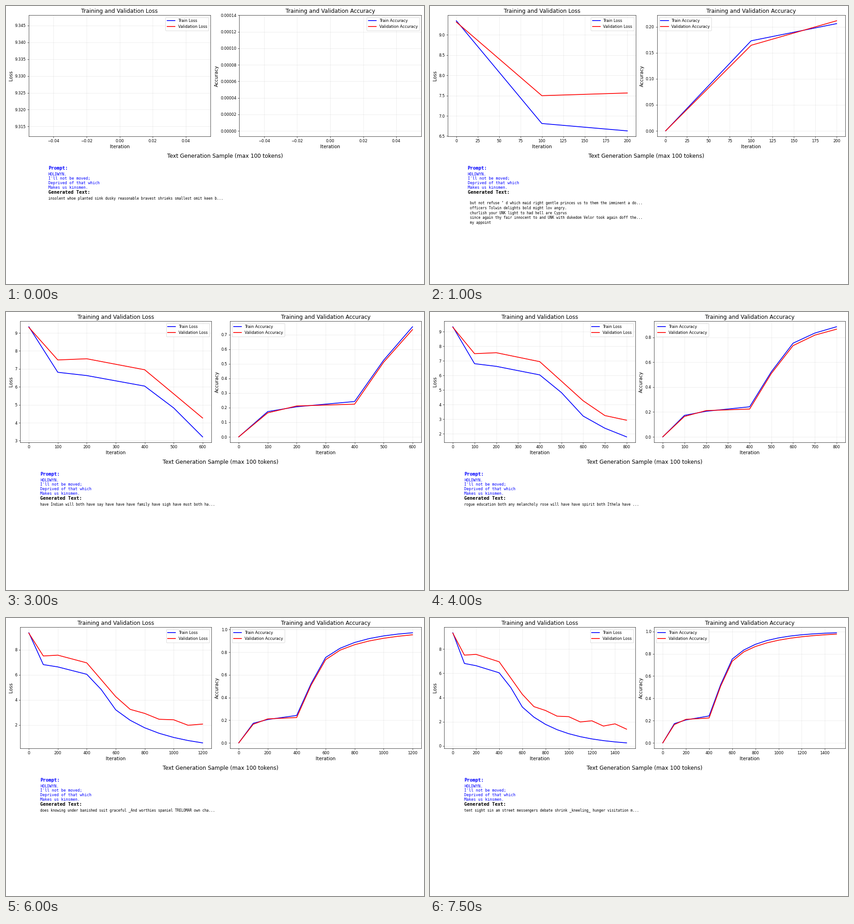
A matplotlib script that plays this animation: 918 by 610 pixels, repeating every 8000 ms.

```python
import numpy as np
import matplotlib.pyplot as plt
from matplotlib.animation import FuncAnimation

W, H, DPI = 918, 610, 61.61
STEP = 100  # iterations between two evaluations
KEYS = (0, 1, 2, 4, 5, 6)  # evaluations where the curves bend

PROMPT = "HOLDWYN.\nI'll not be moved;\nDeprived of that which\nMakes us kinsmen."

SAMPLES = [
    "insolent whoe planted sink dusky reasonable bravest shrieks smallest omit keen b...",

    "the of and to UNK thou is my\n"
    " with not his lord the you a\n"
    " and it for me be UNK this\n"
    " your in that he good but him\n"
    " what so we shall her no\n"
    " come sir do are on by\n"
    " will my heart",

    "\n but not refuse ’ d which maid right gentle princes us to them the imminent a do...\n"
    " officers Tolwin delights bold might lov angry.\n"
    " churlish your UNK light to had hell are Cyprus\n"
    " since again thy fair innocent to and UNK with dukedom Velor took again doff the...\n"
    " my appoint",

    "the common ] and from duke with place\n"
    " where not that private use the rest of them\n"
    " UNK save him in foreign empty hands\n"
    " again what the distance, with gentle\n"
    " offices to abject and fair light\n"
    " banish my particular",

    "_ ] the duke distance move in dealt foreign common what, com from the Weird with...\n"
    " feeds, where than that rest Brenolt place private empty abject flies hath Vulca...\n"
    " spurn him UNK scape not save offices use dirt banish particular",

    "have any will both say have will have common have both spirit will have must fai...",
    "have Indian will both have say have have have family have sigh have must both ha...",
    "rose have both will sigh have education have any both have rogue must have will ...",
    "rogue education both any melancholy rose will have have spirit both Ithela have ...",
    "melancholy both have spirit knowing will graceful under have sigh banished own s...",
    "worthies under suit have knowing spaniel banished both graceful own sigh chariot...",
    "graceful suit does under spaniel worthies knowing own both banished hunger visit...",
    "does knowing under banished suit graceful _And worthies spaniel TRELOMAR own cha...",
    "street hunger sin visitation does messengers tent suit shrink am debate sight kn...",
    "debate tent messengers _kneeling_ am sight sin street visitation shrink hunger o...",
    "tent sight sin am street messengers debate shrink _kneeling_ hunger visitation m...",
]

evals = np.arange(len(SAMPLES))


def curve(keys, goal, rate, power, wobble=0):
    """Straight runs between the keys, then a decay from the last key to goal."""
    d = np.maximum(evals - KEYS[-1], 0)
    decay = np.exp(-rate * d**power + wobble * d * (-1.0)**d)
    return goal + (np.interp(evals, KEYS, keys) - goal) * decay


train_loss = curve((9.3464, 6.811, 6.629, 6.042, 4.828, 3.215), 0, 0.30, 0.97)
val_loss = curve((9.3137, 7.498, 7.564, 6.952, 5.613, 4.266), 0, 0.26, 0.62, 0.012)
train_acc = curve((0, 0.173, 0.206, 0.242, 0.524, 0.7535), 1, 0.40, 0.94)
val_acc = curve((0.00013334, 0.1644, 0.2115, 0.2237, 0.510, 0.734), 1, 0.38, 0.85)

# The tiny surplus keeps the pixel size from being truncated downwards.
fig = plt.figure(figsize=((W + 1e-6) / DPI, (H + 1e-6) / DPI), dpi=DPI,
                 facecolor="white")
grid = fig.add_gridspec(2, 2)
ax_loss = fig.add_subplot(grid[0, 0])
ax_acc = fig.add_subplot(grid[0, 1])
ax_text = fig.add_subplot(grid[1, :])


def draw_curves(ax, name, train, val, n):
    ax.clear()
    its = evals[:n] * STEP
    ax.plot(its, train[:n], "b-", lw=2, label=f"Train {name}")
    ax.plot(its, val[:n], "r-", lw=2, label=f"Validation {name}")
    ax.set_title(f"Training and Validation {name}", fontsize=14)
    ax.set_xlabel("Iteration", fontsize=12, labelpad=3)
    ax.set_ylabel(name, fontsize=12)
    ax.grid(True, alpha=0.3)
    ax.legend(fontsize=10)


def write(y, text, size, step=0.04, **style):
    for i, line in enumerate(text.split("\n")):
        ax_text.text(0.05, y - i * step, line, fontsize=size, va="top",
                     family="DejaVu Sans Mono", transform=ax_text.transAxes, **style)


def draw_sample(sample):
    ax_text.clear()
    ax_text.axis("off")
    ax_text.set_title("Text Generation Sample (max 100 tokens)", fontsize=14)
    write(0.95, "Prompt:", 12, color="blue", weight="bold")
    write(0.90, PROMPT, 10, step=0.0363, color="blue")
    write(0.75, "Generated Text:", 12, color="black", weight="bold")
    write(0.70, sample, 9, color="black")


def update(k):
    draw_curves(ax_loss, "Loss", train_loss, val_loss, k + 1)
    draw_curves(ax_acc, "Accuracy", train_acc, val_acc, k + 1)
    draw_sample(SAMPLES[k])
    # One pixel of headroom makes up for the hinted title height.
    fig.tight_layout(pad=0.72, w_pad=0.98, h_pad=1.08, rect=(0, 0, 1, 1 + 1 / H))
    return []


anim = FuncAnimation(fig, update, frames=len(SAMPLES), interval=500,
                     repeat=True, repeat_delay=0, blit=False)
plt.show()
```
